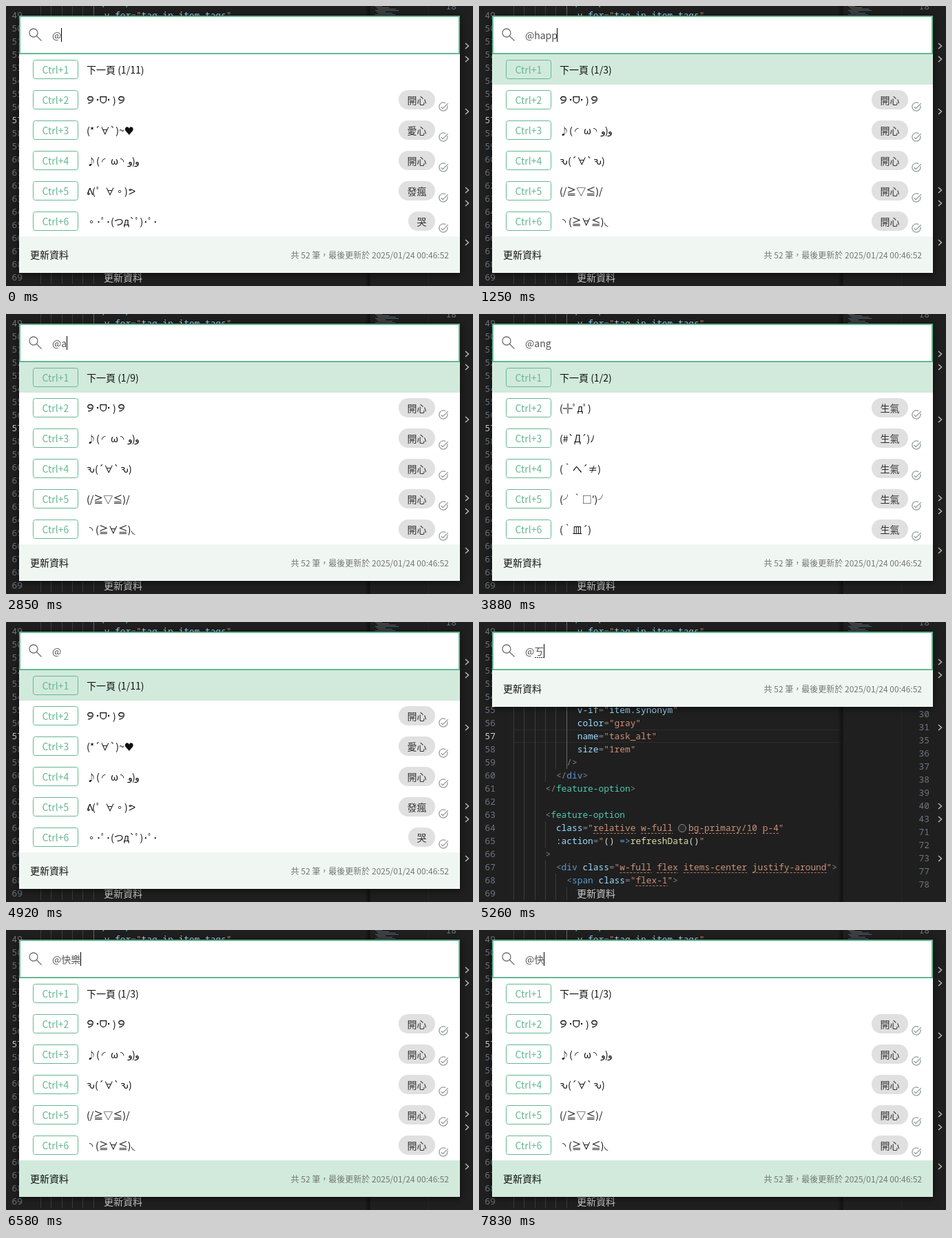
These frames come from a looping animation (678x406 px, 8 s). An HTML page:

```html
<!DOCTYPE html>
<html lang="zh-TW">
<head>
<meta charset="utf-8">
<style>
  html, body { margin: 0; height: 100%; overflow: hidden; background: #1f1f1f; }
  svg { display: block; }
  text { font: 14px "Noto Sans CJK TC", "Noto Sans CJK JP", "DejaVu Sans", sans-serif; white-space: pre; fill: #111; }
  .code, .num { font: 12.83px "Noto Sans Mono", "Noto Sans CJK TC", monospace; fill: #ccc; }
  .num { text-anchor: end; fill: #6e7681; }
  .zh { fill: #ccc; }
  .p { fill: #808080; } .t { fill: #569cd6; } .c { fill: #4ec9b0; } .a { fill: #9cdcfe; }
  .s, .u { fill: #ce9178; } .f { fill: #dcdcaa; } .w { fill: #d4d4d4; }
  .key { fill: #65b891; }
  .tag { fill: #333; }
  .info { font-size: 12px; fill: #757575; }
  #query { fill: #505050; }
  .line { fill: none; stroke-width: 1.3; }
  #panel { filter: drop-shadow(0 2px 5px rgba(0, 0, 0, .6)); }
</style>
</head>
<body>
<svg width="678" height="406" viewBox="0 0 678 406">
  <defs><linearGradient id="edge"><stop stop-color="#000" stop-opacity="0"/><stop offset="1" stop-color="#000" stop-opacity=".45"/></linearGradient></defs>
  <g id="editor"></g>
  <g id="panel">
    <rect id="sheet" x="19" y="14" width="640" fill="#fff"/>
    <rect id="firstRow" x="19" y="70" width="640" height="44" fill="#d1eadc"/>
    <g id="rows"></g>
    <g id="footer">
      <rect x="19" width="640" height="53" fill="#f0f7f3"/>
      <rect id="footerGlow" x="19" width="640" height="53" fill="#d1eadc"/>
      <text x="35" y="32">更新資料</text>
      <text class="info" x="643" y="32" text-anchor="end">共 52 筆，最後更新於 2025/01/24 00:46:52</text>
    </g>
    <rect x="20" y="15" width="638" height="54" fill="#fff" stroke="#65b891" stroke-width="2"/>
    <path class="line" stroke="#707070" d="M46 39a6 6 0 1 1-12 0a6 6 0 1 1 12 0M44.5 43.5l7 7"/>
    <text id="query" x="67" y="48"></text>
    <path id="compose" stroke="#222" stroke-dasharray="2 1"/>
    <rect id="caret" y="32" width="1" height="20"/>
  </g>
</svg>
<script>
const $ = id => document.getElementById(id);
const esc = s => s.replace(/&/g, '&amp;').replace(/</g, '&lt;');
const text = (x, y, s, cls = '') => `<text class="${cls}" x="${x}" y="${y}">${esc(s)}</text>`;

// ---- code editor behind the panel ----
const CH = 7.7, LEFT = 50.3;
const lineY = n => 13 + 19 * (n - 49);
// [line, column, tokens]; the first letter of a token is its colour class, u is underlined
const code = [
  [48, 10, 'p<', 'cq-chip'],
  [49, 12, 'av-for', 'p=', 's"', 'atag in item.tags', 's"'],
  [55, 12, 'av-if', 'p=', 's"', 'aitem.synonym', 's"'],
  [56, 12, 'acolor', 'p=', 's"gray"'],
  [57, 12, 'aname', 'p=', 's"task_alt"'],
  [58, 12, 'asize', 'p=', 's"1rem"'],
  [59, 10, 'p/>'],
  [60, 8, 'p</', 'tdiv', 'p>'],
  [61, 6, 'p</', 'cfeature-option', 'p>'],
  [63, 6, 'p<', 'cfeature-option'],
  [64, 8, 'aclass', 'p=', 's"', 'urelative', 's ', 'uw-full'],
  [64, 32.95, 'ubg-primary/10', 's ', 'up-4', 's"'],
  [65, 8, 'a:action', 'p=', 's"', 'w() ', 't=>', 'frefreshData', 'w()', 's"'],
  [66, 6, 'p>'],
  [67, 8, 'p<', 'tdiv ', 'aclass', 'p=', 's"', 'uw-full', 's ', 'uflex', 's ', 'uitems-center', 's ', 'ujustify-around', 's"', 'p>'],
  [68, 10, 'p<', 'tspan ', 'aclass', 'p=', 's"', 'uflex-1', 's"', 'p>']
];

function drawEditor() {
  let out = '<path stroke="#2c2c2c" d="M50 156.5H527M50 174.5H527"/>';
  for (let n = 48; n < 70; n++) {
    const y = lineY(n);
    out += `<text class="num" x="24" y="${y + 5}" ${n == 57 ? 'style="fill:#ccc"' : ''}>${n}</text>`;
    const depth = n < 60 || n == 69 ? 6 : [60, 64, 65, 67].includes(n) ? 4 : n == 68 ? 5 : 3;
    for (let i = 0; i < depth; i++)
      out += `<rect x="${Math.floor(LEFT + i * 2 * CH)}" y="${y - 9}" width="1" height="19" fill="${i == 5 && n < 60 ? '#686868' : '#3c3c3c'}"/>`;
  }
  for (const [n, start, ...tokens] of code) {
    const y = lineY(n) + 5;
    let col = start, spans = '';
    for (const token of tokens) {
      const cls = token[0], s = token.slice(1), x = LEFT + col * CH;
      spans += `<tspan class="${cls}">${esc(s)}</tspan>`;
      if (cls == 'u') out += `<path stroke="#b17a65" stroke-dasharray="3 2" d="M${x} ${y + 3.5}h${s.length * CH}"/>`;
      col += s.length;
    }
    out += `<text class="code" x="${LEFT + start * CH}" y="${y}">${spans}</text>`;
  }
  out += text(142, 399, '更新資料', 'zh');
  out += '<circle cx="295" cy="299" r="5.5" fill="#2b2b2b" stroke="#888"/>';

  // minimap and second editor
  out += '<rect x="521" width="7" height="406" fill="url(#edge)"/><path stroke="#181818" d="M528.5 0V406"/><path stroke="#272727" d="M613.5 0V406"/>';
  for (let i = 0; i < 7; i++)
    out += `<rect x="${536 + i % 3 * 2}" y="${i * 2}" width="${10 + i * 37 % 29}" height="1" fill="${['#46637a', '#6f5b50', '#5c5c5c'][i % 3]}"/>`;
  out += '<text class="num" x="654" y="5">18</text>';
  [30, 31, 35, 36, 37, 38, 39, 40, 43, 71, 72, 73, 77, 78].forEach((n, i) =>
    out += `<text class="num" x="654" y="${138 + 19 * i}">${n}</text>`);
  for (const y of [58, 77, 153, 267, 286, 343])
    out += `<path class="line" stroke="#c5c5c5" d="M667 ${y - 4}l4.5 4l-4.5 4"/>`;
  $('editor').innerHTML = out;
}

// ---- result lists: faces are "offset:text" pieces ----
const curl = 'c-1-3.5 7-4.5 7.5 0c0 4-3.5 6-7 6.5M118.8 134.5c.5 2.5 4 3 6 1.5';
const faces = {
  smile: 'smile', heart: '0:(*´∀`)~♥',
  music: '0:♪(|22:◜|35:ω|49:◝|60:و|66:)|70:و',
  sly: '0:ԅ|12:(´∀`|49:ԅ|61:)', cheer: '0:(/≧▽≦)/', arms: '4:◝|13:(≧∀≦)|65:◟',
  crazy: '0:ᕕ|8:(|14:ﾟ|27:∀。)|61:ᕗ', cry: '0:。･ﾟ･(つд`ﾟ)･ﾟ･',
  mad: '0:(╬ﾟдﾟ)', glare: '0:(#`Д´)ﾉ', huff: '0:(｀へ´≠)', flip: '0:(╯‵□′)╯', pout: '0:(｀皿´)'
};
const tags = { heart: '愛心', crazy: '發瘋', cry: '哭', mad: '生氣', glare: '生氣', huff: '生氣', flip: '生氣', pout: '生氣' };
const all = ['smile', 'heart', 'music', 'crazy', 'cry'];
const happy = ['smile', 'music', 'sly', 'cheer', 'arms'];
const results = {
  '@': [11, all],
  '@h': [6, ['smile', 'heart', 'music', 'sly', 'cheer']],
  '@ha': [4, happy], '@a': [9, happy],
  '@an': [4, ['crazy', 'mad', 'glare', 'huff', 'cry']],
  '@ang': [2, ['mad', 'glare', 'huff', 'flip', 'pout']]
};

function drawFace(name, mid) {
  if (name == 'smile')
    return `<g transform="translate(0 ${mid - 136})"><path class="line" stroke="#111" d="M118.8 134.5${curl}M137 131.7h8.5v4a4.2 4.8 0 0 1-8.5 0z"/>
      <path class="line" stroke="#111" transform="translate(45 0)" d="M118.8 134.5${curl}"/>
      <circle cx="133" cy="136" r="1.2"/><circle cx="149" cy="136" r="1.2"/>${text(155, 142, ')')}</g>`;
  return faces[name].split('|').map(piece => {
    const [dx, s] = piece.split(':');
    return text(117 + +dx, mid + 6, s);
  }).join('');
}

function drawRows([pages, names]) {
  let out = text(117, 98, `下一頁 (1/${pages})`);
  for (let i = 0; i < 6; i++) {
    const mid = 92 + 44 * i;
    out += `<rect x="39.5" y="${mid - 13.5}" width="65" height="27" rx="3" fill="none" stroke="#65b891"/>` + text(52.5, mid + 6, `Ctrl+${i + 1}`, 'key');
    if (!i) continue;
    const name = names[i - 1], tag = tags[name] || '開心', w = 25 + 14 * tag.length;
    out += drawFace(name, mid);
    out += `<rect x="${623 - w}" y="${mid - 14}" width="${w}" height="28" rx="14" fill="#e0e0e0"/>` + text(635.5 - w, mid + 6, tag, 'tag');
    out += `<path class="line" stroke="#8f9a94" transform="translate(635 ${mid + 10})" d="M3.2-5.2A6.1 6.1 0 1 0 5.8-1.7M-3.3.2L-.8 2.7L6.8-4.9"/>`;
  }
  return out;
}

// ---- timeline: [ms, query, caret hidden] ----
const steps = [
  [0, '@'], [530, '@', 1], [740, '@h'], [810, '@ha'], [1120, '@hap'], [1250, '@happ'], [1800, '@happ', 1],
  [2250, '@hap'], [2390, '@ha'], [2550, '@h'], [2730, '@'], [2850, '@a'], [3060, '@an'], [3400, '@ang'],
  [3880, '@ang', 1], [4370, '@an'], [4550, '@a'], [4710, '@'], [4920, '@', 1],
  [5260, '@ㄎ'], [5350, '@ㄎㄨ'], [5430, '@ㄎㄨㄞ'], [5510, '@快'], [5720, '@快ㄌ'], [6260, '@快ㄌㄜ'],
  [6420, '@快樂'], [6580, '@快樂'], [7120, '@快樂', 1], [7620, '@快樂'], [7830, '@快']
];
const LOOP = 8000, COMPOSE = 5260, COMMIT = 6580;
let shown;

function showStep(step) {
  const [at, query, hidden] = step;
  const composing = at >= COMPOSE && at < COMMIT;
  $('query').textContent = query;
  const end = Math.floor(67 + $('query').getComputedTextLength());
  $('caret').setAttribute('x', end);
  $('caret').setAttribute('opacity', hidden ? 0 : 1);
  $('compose').setAttribute('d', composing ? `M81 51.5H${end}` : '');
  $('rows').innerHTML = composing ? '' : drawRows(results[query] || [3, happy]);
  $('footer').setAttribute('transform', `translate(0 ${composing ? 70 : 334})`);
  $('sheet').setAttribute('height', composing ? 109 : 373);
}

function fade(t, start) {
  const k = Math.min(1, Math.max(0, (t - start) / 260));
  return k * k * (3 - 2 * k);
}

function tick() {
  const t = performance.now() % LOOP;
  const step = steps.findLast(s => s[0] <= t);
  if (step != shown) showStep(shown = step);
  $('firstRow').setAttribute('opacity', t < COMPOSE ? fade(t, 10) : 0);
  $('footerGlow').setAttribute('opacity', fade(t, COMPOSE));
  requestAnimationFrame(tick);
}

drawEditor();
tick();
</script>
</body>
</html>
```
